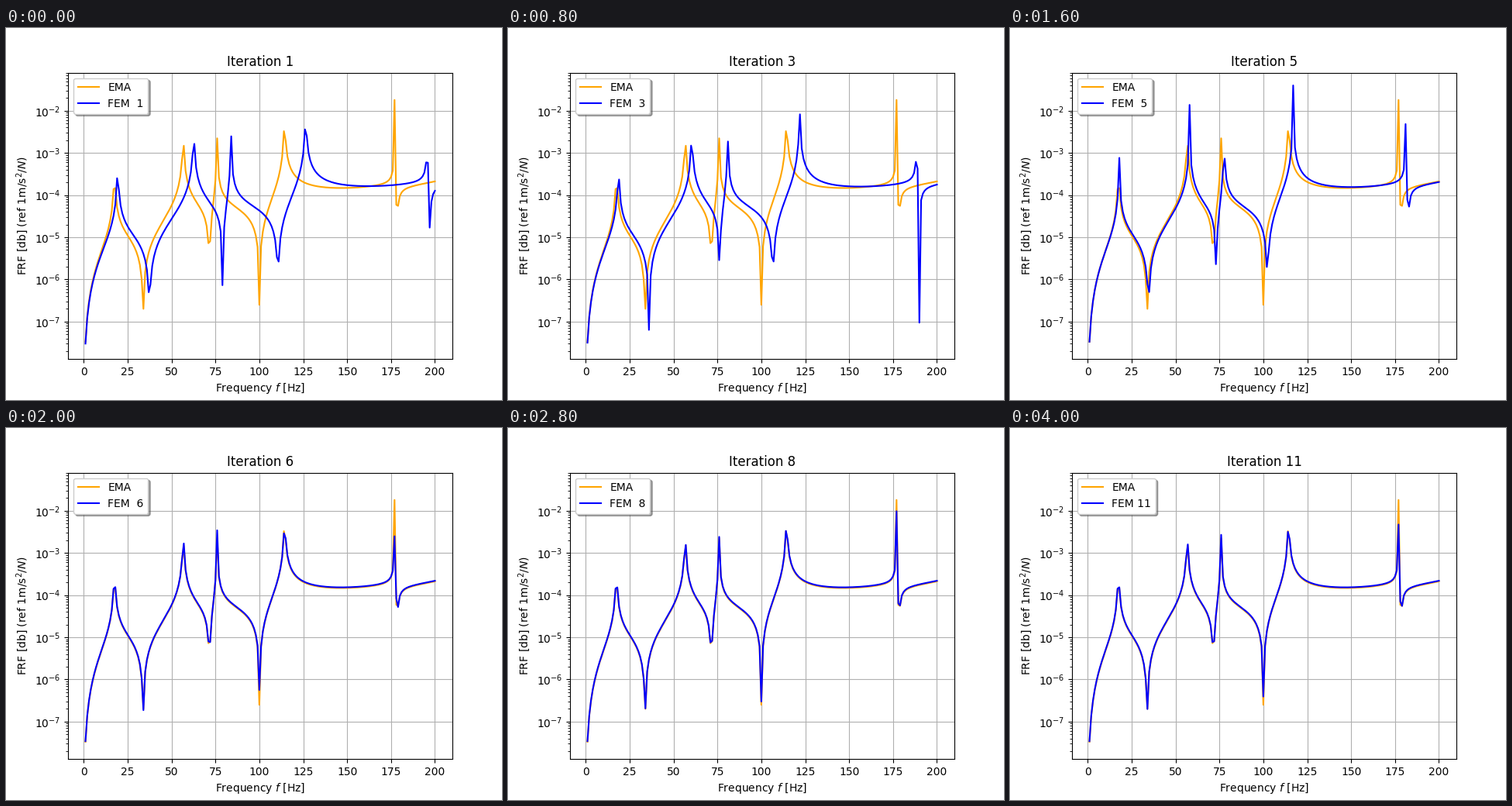
These frames come from a looping animation (640 px wide and 480 px high, 4400 ms). A matplotlib script:

```python
import numpy as np
import matplotlib.pyplot as plt
from matplotlib.animation import FuncAnimation

plt.rcParams["text.kerning_factor"] = 6

ITERATIONS = 11
FREQ = np.arange(1, 201)

# Undamped resonances and antiresonances of the structure in Hz.
POLES = [17.5, 56.67, 75.89, 114.36, 177.015, 260.6]
ZEROS = [33.84, 71.52, 100.043, 178.35]
NON_MINIMUM_PHASE = 217
COMPLIANCE = 3.43e-8


def response(stiffness, gain):
    """Acceleration per force; stiffness scales every frequency alike."""
    f = FREQ / np.sqrt(stiffness)
    h = gain * COMPLIANCE * f**2 * (1 + (f / NON_MINIMUM_PHASE) ** 2)
    for z in ZEROS:
        h = h * (1 - (f / z) ** 2)
    for p in POLES:
        h = h / (1 - (f / p) ** 2)
    return np.abs(h)


def model_at(iteration):
    """Steady steps down to the measured stiffness, then a slight drift."""
    step = iteration - 1
    stiffness = max(1.2216 - 0.04283 * step - 0.00026 * step**2, 1)
    stiffness += 1e-4 * max(iteration - 7, 0)
    return response(stiffness, stiffness**0.33)


fig, ax = plt.subplots(figsize=(6.4, 4.8), dpi=100)
measured = response(0.99997, 0.965)


def draw(frame):
    iteration = frame + 1
    ax.clear()
    ax.semilogy(FREQ, measured, color="orange", label="EMA")
    ax.semilogy(FREQ, model_at(iteration), color="blue",
                label=f"FEM {iteration:2d}")
    ax.set_xlim(-8.95, 209.95)
    ax.set_ylim(1.292e-8, 8.04e-2)
    ax.set_title(f"Iteration {iteration}")
    ax.set_xlabel("Frequency $f$ [Hz]")
    ax.set_ylabel("FRF [db] (ref 1m/s$^2$/$N$)")
    ax.grid(True)
    ax.legend(loc="upper left", shadow=True)
    return ax.get_children()


anim = FuncAnimation(fig, draw, frames=ITERATIONS, interval=400,
                     init_func=lambda: draw(0), repeat=True, repeat_delay=0)
plt.show()
```
